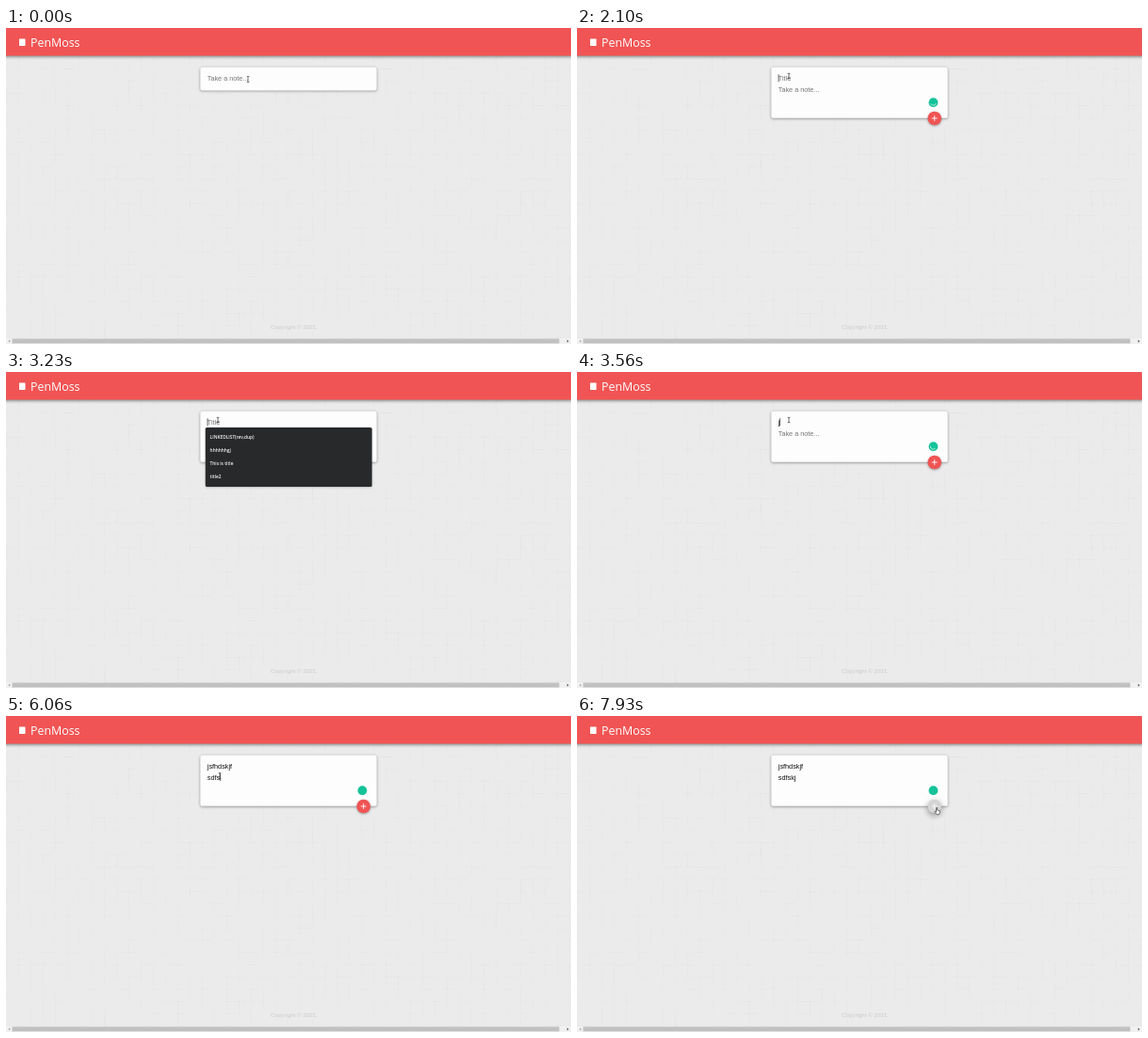
These frames come from a looping animation (600 px wide and 336 px high, 8 s). An HTML page with a canvas:

```html
<!DOCTYPE html>
<html lang="en">
<head>
<meta charset="utf-8">
<title>Notes</title>
<style>
html, body { margin: 0; width: 100%; height: 100%; overflow: hidden; background: #ebebeb; }
canvas { display: block; width: 600px; height: 336px; }
</style>
</head>
<body>
<canvas id="stage"></canvas>
<script>
const W = 600, H = 336, LOOP = 8000;
const RED = '#f05454', GREEN = '#15c39a';
const SANS = '"Liberation Sans", Arial, sans-serif';
const UI = '"Open Sans", sans-serif';
const dpr = window.devicePixelRatio || 1;

const TITLE = { text: 'jsfhdskjf', start: 3550, step: 92 };
const BODY = { text: 'sdfskj', start: 5750, step: 92 };
const OPEN = 1460, FAB = 1640, LIST = [2260, 3545], HOVER = 7270;

// time, x, y
const PATH = [
  [0, 257, 54.5], [700, 257, 54.5], [760, 246, 54.5], [1640, 246, 54.5],
  [1990, 225, 51], [4940, 225, 51], [5200, 227, 63.5], [6570, 227, 63.5],
  [7040, 338, 82], [7080, 338, 82], [7340, 380.5, 96], [7600, 381.5, 97.5]
];
// caret: on, off, row
const CARET = [
  [1130, 1460, 0], [1460, 1630, 1], [2020, 2560, 0], [3130, 3545, 0],
  [3545, 4910, 0], [5220, 5730, 1], [5750, 6720, 1], [7190, 7400, 1]
];

const clamp = v => Math.max(0, Math.min(1, v));
const ease = v => { v = clamp(v); return v * v * (3 - 2 * v); };

function makeCanvas(el) {
  el.width = Math.round(W * dpr);
  el.height = Math.round(H * dpr);
  const c = el.getContext('2d');
  c.scale(dpr, dpr);
  return c;
}

const stage = document.getElementById('stage');
const ctx = makeCanvas(stage);
const backdrop = document.createElement('canvas');
const back = makeCanvas(backdrop);

function rect(c, x, y, w, h, fill) {
  c.fillStyle = fill;
  c.fillRect(x, y, w, h);
}

function round(c, x, y, w, h, r, fill) {
  c.beginPath();
  c.roundRect(x, y, w, h, r);
  c.fillStyle = fill;
  c.fill();
}

function disc(x, y, r, fill) {
  ctx.beginPath();
  ctx.arc(x, y, r, 0, 7);
  ctx.fillStyle = fill;
  ctx.fill();
}

function label(c, text, x, y, font, fill) {
  c.font = font;
  c.fillStyle = fill;
  c.fillText(text, x, y);
}

function poly(c, pts, fill) {
  c.beginPath();
  pts.forEach(p => c.lineTo(p[0], p[1]));
  c.closePath();
  c.fillStyle = fill;
  c.fill();
}

function shadow(c, color, blur, dy) {
  c.shadowColor = color;
  c.shadowBlur = blur * dpr;
  c.shadowOffsetY = dy * dpr;
}

function drawTexture(c) {
  let seed = 11;
  const rnd = () => (seed = seed * 16807 % 2147483647) / 2147483647;
  for (let x = 0; x < W; x += 13) {
    for (let y = 30; y < 330; y += 13) {
      const a = 0.006 + rnd() * 0.014;
      const tone = `rgba(0,0,0,${a})`;
      if (rnd() < 0.6) rect(c, x, y - 6 * rnd(), 0.8, 9 + 8 * rnd(), tone);
      if (rnd() < 0.5) rect(c, x - 5 * rnd(), y, 8 + 7 * rnd(), 0.8, tone);
    }
  }
}

function drawBackdrop(c) {
  rect(c, 0, 0, W, H, '#ebebeb');
  drawTexture(c);
  label(c, 'Copyright © 2021.', 281, 319.5, '6.2px ' + SANS, '#cbcbcb');

  c.save();
  shadow(c, 'rgba(0,0,0,.4)', 3, 1);
  rect(c, -5, -5, W + 10, 34.5, RED);
  c.restore();
  rect(c, 14, 11.5, 6.5, 7.5, '#fff');
  label(c, 'PenMoss', 26, 20.2, '12.4px ' + UI, '#fff');

  rect(c, 0, 330, W, 6, '#f1f1f1');
  rect(c, 6.5, 330.4, 581, 5, '#c1c1c1');
  poly(c, [[2.4, 333], [4.2, 331.6], [4.2, 334.4]], '#a3a3a3');
  poly(c, [[597.6, 333], [595.8, 331.6], [595.8, 334.4]], '#505050');
}

function typed(field, t) {
  const n = t < field.start ? 0 : 1 + Math.floor((t - field.start) / field.step);
  return field.text.slice(0, n);
}

function field(text, hint, y) {
  label(ctx, text || hint, 213.8, y, '7.28px ' + SANS, text ? '#111' : '#757575');
}

function drawCaret(t, rows) {
  const span = CARET.find(s => t >= s[0] && t < s[1]);
  if (!span) return;
  ctx.font = '7.28px ' + SANS;
  const x = 213.7 + ctx.measureText(rows[span[2]]).width;
  rect(ctx, x, 49.3 + span[2] * 11.8, 0.7, 8, '#222');
}

function drawBadge(t) {
  if (t < FAB) return;
  disc(378.4, 79.2, 4.9, GREEN);
  const busy = t < LIST[0] || (t > LIST[1] && t < 4400);
  if (!busy) return;
  const a = 0.3 + (t - 2100) / 700 * Math.PI * 2;
  ctx.beginPath();
  ctx.arc(378.4, 79.2, 3, a, a + 2.4);
  ctx.strokeStyle = '#d8f5ec';
  ctx.lineWidth = 0.8;
  ctx.stroke();
}

function drawFab(t) {
  const size = ease((t - FAB) / 225);
  if (!size) return;
  const h = ease((t - HOVER) / 250);
  const mix = (a, b) => Math.round(a + (b - a) * h);
  ctx.save();
  ctx.translate(379.7, 96);
  ctx.scale(size, size);
  ctx.save();
  shadow(ctx, `rgba(0,0,0,${0.35 + 0.05 * h})`, 2.5 + 4 * h, 1 + 1.5 * h);
  disc(0, 0, 7.3, `rgb(${mix(240, 213)},${mix(84, 213)},${mix(84, 213)})`);
  ctx.restore();
  rect(ctx, -2.9, -0.45, 5.8, 0.9, '#fff');
  rect(ctx, -0.45, -2.9, 0.9, 5.8, '#fff');
  ctx.restore();
}

function drawList(t) {
  if (t < LIST[0] || t >= LIST[1]) return;
  ctx.save();
  shadow(ctx, 'rgba(0,0,0,.3)', 2, 0.5);
  round(ctx, 211.8, 59, 176.8, 63, 1.6, '#27292b');
  ctx.restore();
  ['LINKEDLIST(rev,dup)', 'hhhhhhgj', 'This is title', 'title2'].forEach((s, i) =>
    label(ctx, s, 216.6, 71.3 + i * 14, '600 4.8px ' + UI, '#f4f4f4'));
}

function pointer(t) {
  for (let i = 1; i < PATH.length; i++) {
    const a = PATH[i - 1], b = PATH[i];
    if (t < b[0]) {
      const k = ease((t - a[0]) / (b[0] - a[0]));
      return [a[1] + (b[1] - a[1]) * k, a[2] + (b[2] - a[2]) * k];
    }
  }
  return PATH[PATH.length - 1].slice(1);
}

function drawPointer(t) {
  const [x, y] = pointer(t);
  ctx.save();
  ctx.translate(x, y);
  if (t < HOVER) {
    rect(ctx, -0.35, -2.8, 0.7, 5.6, '#333');
    rect(ctx, -1.4, -3.1, 2.8, 0.6, '#333');
    rect(ctx, -1.4, 2.5, 2.8, 0.6, '#333');
  } else {
    poly(ctx, [[0, 0], [0.9, 0], [1.1, 2.5], [3.6, 3.2], [3.8, 5], [3, 7.2],
      [0.4, 7.2], [-1.6, 4.6], [-1.2, 3.9], [0, 4.8]], '#fff');
    ctx.strokeStyle = '#222';
    ctx.lineWidth = 0.6;
    ctx.lineJoin = 'round';
    ctx.stroke();
  }
  ctx.restore();
}

function draw(t) {
  ctx.drawImage(backdrop, 0, 0, W, H);
  const open = t >= OPEN;

  ctx.save();
  shadow(ctx, 'rgba(0,0,0,.42)', 3, 0.7);
  round(ctx, 206.3, 41.8, 187.4, open ? 54 : 24.6, 2.6, '#fdfdfd');
  ctx.restore();

  const rows = [typed(TITLE, t), typed(BODY, t)];
  if (open) field(rows[0], 'Title', 55.7);
  field(rows[1], 'Take a note...', open ? 67.5 : 55.8);
  drawCaret(t, rows);
  drawBadge(t);
  drawFab(t);
  drawList(t);
  drawPointer(t);
}

drawBackdrop(back);
const begin = performance.now();
function frame() {
  draw((performance.now() - begin) % LOOP);
  requestAnimationFrame(frame);
}
frame();
</script>
</body>
</html>
```
